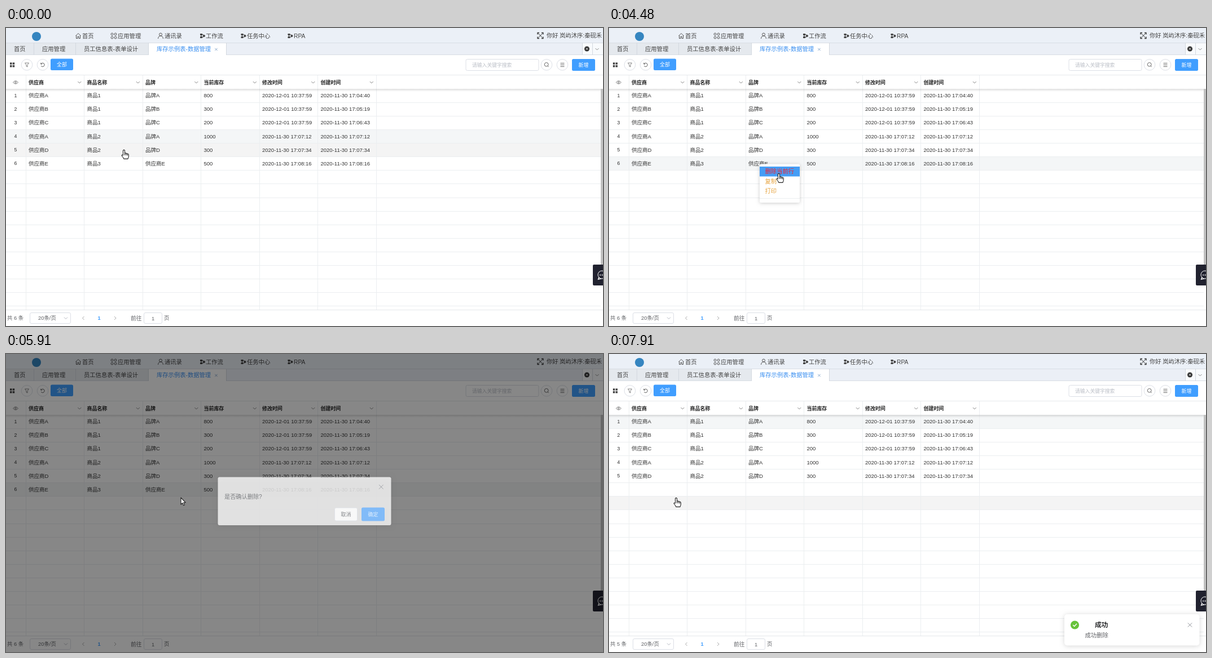
Recreate the animation shown at these times as an HTML page with a canvas. Size 1058 by 529 pixels, loop 7990 ms.

```html
<!DOCTYPE html>
<html lang="zh-CN">
<head>
<meta charset="utf-8">
<title>库存示例表</title>
<style>
html, body { margin: 0; width: 100%; height: 100%; overflow: hidden; background: #fff; }
canvas { display: block; width: 1058px; height: 529px; }
</style>
</head>
<body>
<canvas id="stage" width="1058" height="529"></canvas>
<script>
const c = document.getElementById('stage').getContext('2d');
const LOOP = 7990, W = 1058, H = 529;
const FONT = '"Liberation Sans", "Noto Sans CJK SC", "Noto Sans CJK", sans-serif';
const BLUE = '#409eff', LINE = '#ebeef0', BORDER = '#dcdfe6', INK = '#333', GREY = '#606266';
const ROW0 = 108, ROW_H = 24.07;
const rowY = i => Math.round(ROW0 + i * ROW_H);
const colX = i => 35 + i * 103.5;

// time, x, y of the pointer tip
const PATH = [
  [0, 209, 216], [340, 201, 243], [600, 201, 243], [870, 263, 243], [980, 263, 243],
  [1130, 267, 243], [2140, 267, 243], [2550, 289, 287], [2690, 289, 292], [2850, 289, 292],
  [3090, 289, 280], [3180, 289, 280], [3390, 291, 274], [3560, 291, 274], [3790, 302, 260],
  [3860, 302, 260], [3930, 301, 258], [4480, 301, 258], [4720, 235, 259], [4880, 235, 259],
  [5190, 310, 255], [6150, 310, 255], [6510, 635, 262], [6560, 635, 262], [6740, 644, 288],
  [6870, 644, 288], [6970, 648, 289], [7400, 648, 289], [7830, 119, 255], [LOOP, 119, 255]
];
const HAND = new Path2D('M-1.5 10V1.5Q0-.7 1.5 1.5V6.3Q3 5.3 4 6.8Q5.5 6 6.3 7.5Q8 7 8.3 9V12Q8 14 7 16.4H-.2Q-1 14-4 10.5Q-4 8.3-1.5 10Z');
const KNUCKLES = new Path2D('M1.5 6V10M4 7V10M6.3 8V10.5');
const ARROW = new Path2D('M0 0V12L2.8 9.5L4.6 13.7L6.5 12.9L4.7 8.8H8.3Z');

const ROWS = [
  ['供应商A', '商品1', '品牌A', '800', '2020-12-01 10:37:59', '2020-11-30 17:04:40'],
  ['供应商B', '商品1', '品牌B', '300', '2020-12-01 10:37:59', '2020-11-30 17:05:19'],
  ['供应商C', '商品1', '品牌C', '200', '2020-12-01 10:37:59', '2020-11-30 17:06:43'],
  ['供应商A', '商品2', '品牌A', '1000', '2020-11-30 17:07:12', '2020-11-30 17:07:12'],
  ['供应商D', '商品2', '品牌D', '300', '2020-11-30 17:07:34', '2020-11-30 17:07:34'],
  ['供应商E', '商品3', '供应商E', '500', '2020-11-30 17:08:16', '2020-11-30 17:08:16']
];

const clamp = v => Math.max(0, Math.min(1, v));

// cubic-bezier(.25, .1, .25, 1)
function ease(x) {
  x = clamp(x);
  let lo = 0, hi = 1, u;
  for (let i = 0; i < 20; i++) {
    u = (lo + hi) / 2;
    if (.75 * u * (1 - u) + u ** 3 < x) lo = u; else hi = u;
  }
  return .3 * u * (1 - u) ** 2 + 3 * u * u * (1 - u) + u ** 3;
}

function pointerAt(t) {
  const i = Math.max(1, PATH.findIndex(k => k[0] > t));
  const [t0, x0, y0] = PATH[i - 1], [t1, x1, y1] = PATH[i];
  const p = (t - t0) / (t1 - t0);
  return [x0 + (x1 - x0) * p, y0 + (y1 - y0) * p];
}

// y is the vertical middle of the glyphs
function text(s, x, y, size, color = INK, align = 'left', bold = '') {
  c.font = `${bold} ${size}px ${FONT}`;
  c.textAlign = align;
  c.fillStyle = color;
  c.fillText(s, x, y + size * .37);
}
function rect(x, y, w, h, color) {
  c.fillStyle = color;
  c.fillRect(x, y, w, h);
}
function box(x, y, w, h, r, fill, border) {
  c.beginPath();
  c.roundRect(x, y, w, h, r);
  if (fill) { c.fillStyle = fill; c.fill(); }
  if (border) { c.strokeStyle = border; c.lineWidth = 1; c.stroke(); }
}
function circle(x, y, r, fill, border) {
  box(x - r, y - r, 2 * r, 2 * r, r, fill, border);
}
function line(d, x, y, color = GREY, width = 1) {
  c.save();
  c.translate(x, y);
  c.strokeStyle = color;
  c.lineWidth = width;
  c.stroke(new Path2D(d));
  c.restore();
}
function shadowBox(x, y, w, h, r, blur, alpha) {
  c.save();
  c.shadowColor = `rgba(0,0,0,${alpha})`;
  c.shadowBlur = blur;
  c.shadowOffsetY = 1;
  box(x, y, w, h, r, '#fff');
  c.restore();
}
const chevron = (x, y, color = '#888') => line('M-3-1.5L0 1.5L3-1.5', x, y, color);
const cross = (x, y, r, color) => line(`M${-r} ${-r}L${r} ${r}M${r} ${-r}L${-r} ${r}`, x, y, color);

function flowIcon(x) {
  rect(x - 4, 10, 4, 3, '#444');
  rect(x - 4, 15, 4, 3, '#444');
  line('M-2-2V2M0-2H2V2M0 2H2', x, 14, '#444');
  circle(x + 3, 14, 2, '#444');
}

function drawTop() {
  rect(0, 0, W, 26, '#ebf0f7');
  circle(54, 15, 8, '#3585c0');
  line('M-4.5 0L0-4.5L4.5 0M-3.5-1V4.5H-1V1H1V4.5H3.5V-1', 128, 14, '#555');
  for (const [dx, dy] of [[-3, -3], [3, -3], [-3, 3], [3, 3]]) circle(191 + dx, 14 + dy, 2, null, '#555');
  circle(274, 11.5, 2.5, null, '#555');
  line('M-4.5 5Q-4 0 0 0Q4 0 4.5 5', 274, 14, '#555');
  [348, 420.5, 503.5].forEach(flowIcon);
  ['首页', '应用管理', '通讯录', '工作流', '任务中心', 'RPA'].forEach((s, i) =>
    text(s, [135, 198, 281, 354, 427, 510][i], 14, 10.3, '#444'));
  cross(947, 13.5, 4, '#333');
  line('M-5-2V-5H-2M2-5H5V-2M5 2V5H2M-2 5H-5V2', 947, 13.5, '#333', 1.3);
  text('你好 岚屿沐序:秦砚禾', 958, 13.5, 10.25, '#444');

  rect(0, 26, W, 22, '#ebeff6');
  rect(0, 26, 252, 22, '#e5e9ee');
  rect(253, 26, 138, 22, '#fff');
  rect(1021, 26, 37, 22, '#f8fafc');
  rect(0, 26, W, 1, '#d8dde4');
  rect(0, 47, 252, 1, '#d8dde4');
  rect(391, 47, W - 391, 1, '#d8dde4');
  for (const x of [49, 123, 252, 390, 1021, 1039]) rect(x, 26, 1, 22, '#d3d8df');
  text('首页', 14, 37.5, 10.3, '#444');
  text('应用管理', 64, 37.5, 10.3, '#444');
  text('员工信息表-表单设计', 138, 37.5, 10.3, '#444');
  text('库存示例表-数据管理', 267, 37.5, 10.3, '#3a8ff0');
  cross(372.5, 38, 2.2, '#8aa9cc');
  circle(1029.5, 37, 4.5, '#333');
  cross(1029.5, 37, 1.6, '#fff');
  chevron(1047.5, 37.5);
}

function drawToolbar() {
  for (const x of [7, 11.7]) for (const y of [61.3, 66]) rect(x, y, 3.5, 3.5, '#444');
  for (const x of [37, 65, 958, 986]) circle(x, 65.3, 9.8, '#fff', BORDER);
  line('M-3.5-3.5H3.5L1 0V3.5L-1 2.5V0Z', 37, 65.5, '#777', .9);
  line('M-2.8-1.6A3.2 3.2 0 1 1-2.8 1.8M-3.2-3.6V-1.2H-.8', 65, 65.3, '#555');
  circle(957.7, 64.8, 3.4, null, '#666');
  line('M0 0L1.8 1.8', 960, 67.3, '#666');
  line('M-3.5-3H3.5M-3.5 0H3.5M-3.5 3H3.5', 986, 65.5, '#666');
  box(79, 54.5, 40, 20.5, 2.5, BLUE);
  text('全部', 99, 65, 9, '#fff', 'center');
  box(815, 55.5, 129, 20, 2.5, '#fff', BORDER);
  text('请输入关键字搜索', 826, 65.5, 8.8, '#bbbfc7');
  box(1003, 55, 41, 21, 2.5, BLUE);
  text('新增', 1023.5, 65.5, 9, '#fff', 'center');
}

function drawTable(count, current, hovered) {
  if (hovered >= 0) rect(0, rowY(hovered), 1054, 24, '#f4f4f4');
  rect(0, rowY(current), 1054, 24, '#f4f6f7');
  for (let i = 1; i <= 16; i++) rect(0, rowY(i), 1054, 1, LINE);
  for (let i = 0; i < 7; i++) rect(Math.floor(colX(i)), 84, 1, 416, LINE);
  ROWS.slice(0, count).forEach((row, i) => {
    const y = 119.8 + i * ROW_H;
    text(i + 1, 17, y, 8.8, INK, 'center');
    row.forEach((s, j) => text(s, colX(j) + 5, y, 9.5));
  });

  const shade = c.createLinearGradient(0, 108, 0, 113);
  shade.addColorStop(0, 'rgba(0,0,0,.13)');
  shade.addColorStop(1, 'rgba(0,0,0,0)');
  rect(0, 108, 1054, 5, shade);
  rect(0, 83, W, 1, '#e6e9ec');
  line('M-4.5 0Q0-5.5 4.5 0Q0 5.5-4.5 0Z', 17, 96.5, '#777', .9);
  circle(17, 96.5, 1.4, null, '#777');
  ['供应商', '商品名称', '品牌', '当前库存', '修改时间', '创建时间'].forEach((s, i) => {
    text(s, colX(i) + 5, 96.8, 8.95, '#222', 'left', 'bold');
    chevron(colX(i) + 95.3, 96.5);
  });
  rect(1054, 108, 4, 313, '#c1c1c1');
}

function drawFooter(count) {
  rect(0, 500, W, 29, '#fff');
  rect(0, 500, W, 1, '#e4e7ea');
  text(`共 ${count} 条`, 2, 515, 9.4, GREY);
  box(42.5, 505.5, 72, 19, 2.5, '#fff', BORDER);
  text('20条/页', 57, 515, 9.4, GREY);
  chevron(106, 515, '#b4b8c0');
  line('M1.5-3L-1.5 0L1.5 3', 137, 515, '#aaa');
  text('1', 165, 515, 9.2, BLUE, 'center', 'bold');
  line('M-1.5-3L1.5 0L-1.5 3', 193.5, 515, '#aaa');
  text('前往', 221, 515.5, 9.7, GREY);
  box(244.5, 505.5, 32, 19, 2.5, '#fff', BORDER);
  text('1', 260.5, 515.5, 9.4, GREY, 'center');
  text('页', 280, 515, 9.4, GREY);
}

function drawChat() {
  box(1040, 420, 22, 37, 2, '#21222f');
  circle(1056, 438, 7, null, '#fff');
  line('M-5 4L-6.5 8L-1 6.8', 1056, 438, '#fff', 1.3);
  for (const x of [1053, 1056.5]) circle(x, 438.5, 1, '#fff');
}

function drawMenu(px, py) {
  shadowBox(267, 241.5, 71, 68.5, 2, 6, .2);
  const active = px >= 267 && px < 338 ? Math.floor((py - 245.5) / 17.5) : -1;
  if (active >= 0 && active < 3) rect(267, Math.round(245.5 + active * 17.5), 71, 17.5, '#459df5');
  text('删除当前行', 276.5, 254.5, 10.3, '#f5222d');
  text('复制', 276.5, 272, 10.3, '#e6a23c');
  text('打印', 276.5, 289.5, 10.3, '#e6a23c');
  rect(267, 302, 71, 1, LINE);
}

function drawDialog(shown, pressed) {
  c.save();
  c.globalAlpha = shown;
  c.translate(0, 221.7 - 13.6 * (1 - shown));
  shadowBox(375.5, 0, 307, 85.5, 3, 8, .1);
  cross(664.8, 17.3, 3.8, '#909399');
  text('是否确认删除?', 387, 34.8, 10.2, GREY);
  box(582.5, 54.5, 40, 23, 2.5, '#fff', BORDER);
  text('取消', 602.5, 66, 9, GREY, 'center');
  box(630, 54, 41, 24, 2.5, pressed ? '#3a8ee6' : '#66b1ff');
  text('确定', 650.5, 66, 9, '#fff', 'center');
  c.restore();
}

function drawNotice(shown) {
  c.save();
  c.globalAlpha = shown;
  c.translate(251 * (1 - shown), 0);
  shadowBox(807, 462, 239.5, 55.5, 5, 9, .16);
  circle(825.5, 481, 7.6, '#67c23a');
  line('M-3.2 0L-.8 2.5L3.5-2.2', 825.5, 481, '#fff', 1.5);
  text('成功', 861, 480.5, 11.8, '#303133', 'left', 'bold');
  text('成功删除', 843.5, 499.5, 10.3, GREY);
  cross(1029.5, 481, 3.6, '#909399');
  c.restore();
}

function drawPointer(x, y, arrow) {
  c.save();
  c.translate(Math.round(x), Math.round(y));
  c.fillStyle = '#fff';
  c.strokeStyle = '#222';
  c.lineWidth = 1.1;
  c.lineJoin = 'round';
  c.fill(arrow ? ARROW : HAND);
  c.stroke(arrow ? ARROW : HAND);
  if (!arrow) c.stroke(KNUCKLES);
  c.restore();
}

function draw(t) {
  const [px, py] = pointerAt(t);
  const OPEN = 5770, CLOSE = 7155, DELETED = 7400;
  const deleted = t >= DELETED;
  const count = deleted ? 5 : 6;
  const current = deleted ? 0 : t < 1750 ? 3 : 5;
  const hovered = t < 1750 || deleted ? Math.floor((py - ROW0) / ROW_H) : -1;

  rect(0, 0, W, H, '#fff');
  drawTop();
  drawToolbar();
  drawTable(count, current, hovered);
  drawFooter(count);
  drawChat();
  if (t >= 1750 && t < 5720) drawMenu(px, py);

  const fade = ms => ease((t - OPEN) / ms) - ease((t - CLOSE) / ms);
  rect(0, 0, W, H, `rgba(0,0,0,${.5 * fade(200)})`);
  if (fade(300) > 0) drawDialog(fade(300), t >= 6900 && t < 6970);
  if (deleted) drawNotice(ease((t - DELETED) / 300));
  drawPointer(px, py, t >= 5720 && t < 6680);
}

function frame(now) {
  draw(now % LOOP);
  requestAnimationFrame(frame);
}
requestAnimationFrame(frame);
</script>
</body>
</html>
```
